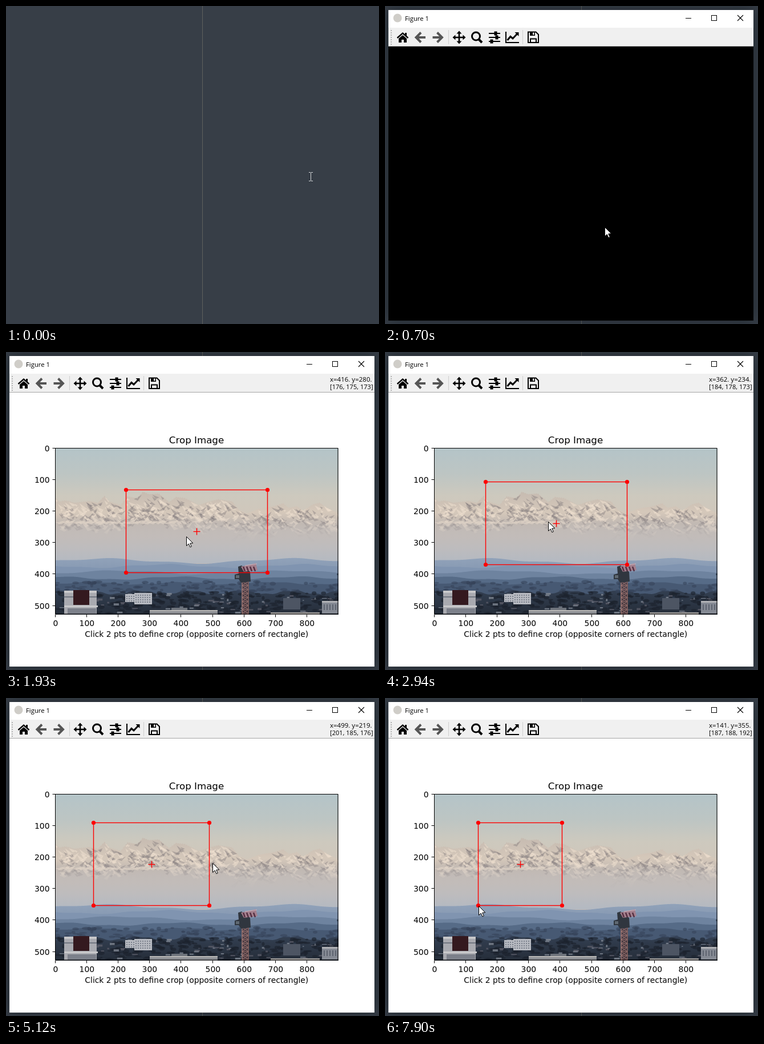
Write an HTML page with a canvas that moves like this. It is 654x557 px and loops after 8 s.

```html
<!DOCTYPE html>
<html lang="en">
<head>
<meta charset="utf-8">
<title>Crop Image</title>
<style>
html, body { margin: 0; width: 100%; height: 100%; overflow: hidden; background: #373e47; }
canvas { display: block; }
</style>
</head>
<body>
<canvas id="stage" width="654" height="557"></canvas>
<script>
const LOOP = 8000;
const SCALE = 0.5511;                       // screen pixels per image pixel
const AXES = { x: 86.5, y: 168.5, w: 496, h: 291 };
const PLOT_FONT = '"DejaVu Sans", sans-serif';
const UI_FONT = '"Open Sans", sans-serif';
const screenX = x => AXES.x + x * SCALE;
const screenY = y => AXES.y + y * SCALE;
const lerp = (a, b, p) => a + (b - a) * p;
const main = document.getElementById('stage').getContext('2d');
let ctx = main;

// ---- motion: pointer (x, y) and crop box (l, t, r, b) in image pixels ----
const START = { x: 812, y: 237, l: 225, t: 132, r: 675, b: 396 };
const MOVES = [
  [80, 240, 3, { x: 743, y: 427 }],
  [390, 560, 3, { x: 707, y: 418 }],
  [630, 700, 2, { x: 542, y: 397 }],
  [780, 780, 1, { x: 530, y: 400 }],
  [930, 1330, 6, { x: 505, y: 404 }],
  [1550, 1710, 3, { x: 385, y: 350 }],
  [1780, 1930, 3, { x: 416, y: 280 }],
  [2010, 2240, 4, { x: 424, y: 259 }],
  [2480, 3180, 10, { x: 321, y: 217, l: 121.5, t: 90, r: 571.5, b: 354 }],
  [3630, 3860, 4, { x: 600, y: 213 }],
  [4180, 4180, 1, { x: 590, y: 215 }],
  [4260, 4330, 2, { x: 581, y: 216 }],
  [4650, 5440, 11, { x: 431, y: 222, r: 422 }],
  [5510, 5670, 3, { x: 416, y: 222, r: 406.5 }],
  [5890, 6050, 3, { x: 345, y: 246 }],
  [6120, 6190, 2, { x: 164, y: 237 }],
  [6340, 6420, 2, { x: 130, y: 233 }],
  [6570, 6570, 1, { x: 123, y: 233 }],
  [6740, 6810, 2, { x: 101, y: 233 }],
  [7120, 7200, 2, { x: 112, y: 236, l: 123 }],
  [7370, 7370, 1, { x: 118, y: 240, l: 126 }],
  [7600, 7900, 5, { x: 141, y: 355, l: 140 }],
];

// Fraction completed after equally spaced jumps, the first at `from`, the last at `to`.
function stepped(t, from, to, count) {
  if (t < from) return 0;
  return Math.min(count, 1 + Math.floor((t - from + 0.5) / ((to - from) / (count - 1)) || 0)) / count;
}

function stateAt(t) {
  const s = { ...START };
  for (const [from, to, count, target] of MOVES) {
    if (t < from) break;
    const p = count === 1 ? 1 : stepped(t, from, to, count);
    for (const key in target) s[key] = lerp(s[key], target[key], p);
  }
  return s;
}

// Pixel colours reported by the status text, by image row
const SAMPLES = [[0, [181, 196, 200]], [215, [205, 187, 177]], [246, [171, 173, 170]],
  [280, [176, 175, 173]], [355, [187, 188, 192]], [410, [112, 134, 161]]];
function colourAt(y) {
  const i = Math.max(1, SAMPLES.findIndex(s => s[0] >= y));
  const [y0, a] = SAMPLES[i - 1], [y1, b] = SAMPLES[i];
  return a.map((v, n) => Math.round(lerp(v, b[n], (y - y0) / (y1 - y0))));
}

// ---- drawing helpers ----
function box(x, y, w, h, fill) { ctx.fillStyle = fill; ctx.fillRect(x, y, w, h); }
function trace(points) {
  ctx.beginPath();
  points.forEach(([x, y]) => ctx.lineTo(x, y));
}
function line(points, colour, width = 1) {
  trace(points);
  ctx.strokeStyle = colour; ctx.lineWidth = width; ctx.stroke();
}
function shape(points, fill) { trace(points); ctx.fillStyle = fill; ctx.fill(); }
function disc(x, y, r, fill) {
  ctx.beginPath(); ctx.arc(x, y, r, 0, 7); ctx.fillStyle = fill; ctx.fill();
}
function ring(x, y, r, colour, width) {
  ctx.beginPath(); ctx.arc(x, y, r, 0, 7);
  ctx.strokeStyle = colour; ctx.lineWidth = width; ctx.stroke();
}
function text(str, x, y, size, family, align = 'left') {
  ctx.font = `${size}px ${family}`; ctx.textAlign = align;
  ctx.fillStyle = '#000'; ctx.fillText(str, x, y);
}
function gradient(y0, y1, ...stops) {
  const g = ctx.createLinearGradient(0, y0, 0, y1);
  stops.forEach(([at, colour]) => g.addColorStop(at, colour));
  return g;
}

// ---- landscape picture ----
const RIDGE = [[86, 256], [94, 262], [104, 260], [120, 264], [147, 261], [161, 264], [173, 252],
  [181, 262], [201, 268], [213, 253], [230, 256], [240, 245], [251, 249], [268, 248], [286, 263],
  [298, 254], [314, 256], [338, 268], [356, 262], [372, 258], [397, 262], [408, 276], [422, 283],
  [442, 275], [470, 270], [486, 265], [496, 273], [510, 270], [521, 278], [538, 267], [550, 264],
  [563, 273], [583, 283]];
function ridgeAt(x) {
  const i = Math.max(1, RIDGE.findIndex(p => p[0] >= x));
  const [x0, y0] = RIDGE[i - 1], [x1, y1] = RIDGE[i];
  return lerp(y0, y1, (x - x0) / (x1 - x0)) + Math.sin(x * 1.7) * 0.9;
}

function drawPicture() {
  let seed = 11;
  const random = () => (seed = seed * 16807 % 2147483647) / 2147483647;
  const left = 86, right = 583, floor = 460;
  const below = yAt => {
    const pts = [];
    for (let x = left; x <= right; x += 1) pts.push([x, yAt(x)]);
    return [...pts, [right, floor], [left, floor]];
  };

  box(left, 168, 498, 292, gradient(168, 320, [0, '#b4c4c8'], [0.3, '#bdc5c3'], [0.55, '#cdc9be'], [1, '#d3c5b8']));
  shape(below(ridgeAt), gradient(245, 325, [0, '#c6bbb1'], [0.45, '#d5c8ba'], [0.7, '#c0b7b0'], [1, '#c2bbb7']));

  // Rock shadows and sunlit snow, slanting down from the crest
  ctx.save();
  trace(below(ridgeAt)); ctx.clip();
  for (let i = 0; i < 620; i++) {
    const x = left + random() * 498, depth = random();
    const y = ridgeAt(Math.min(x, 582)) + depth * 46;
    const len = 4 + random() * 12, drop = len * (0.3 + random() * 0.5), slant = random() < 0.72 ? 1 : -1;
    const colour = random() < 0.46 ? 'rgba(126,120,122,.42)' : 'rgba(239,225,208,.55)';
    shape([[x, y], [x + slant * len, y + drop], [x + slant * len * 0.5, y + drop + 2.5]], colour);
  }
  for (let x = left; x < 290; x += 9)
    shape([[x, 296 + random() * 4], [x + 18, 294 + random() * 5], [x + 10, 302]], 'rgba(232,218,202,.7)');
  ctx.restore();
  box(left, 290, 498, 80, gradient(290, 370, [0, 'rgba(194,188,185,0)'], [0.4, 'rgba(194,188,185,.92)'],
    [0.65, '#bebcbd'], [1, '#b3b9c2']));

  const hill = (base, rise, freq, phase, colour) =>
    shape(below(x => base + Math.sin(x * freq + phase) * rise + Math.sin(x * freq * 3.1) * rise * 0.3), colour);
  hill(366, 4, 0.019, 1.5, gradient(360, 400, [0, '#91a2b9'], [1, '#7f93ae']));
  hill(375, 3, 0.026, 3.8, '#8094b0');
  hill(386, 3, 0.021, 0.6, '#6e839f');
  hill(396, 2.5, 0.03, 2, '#566b87');
  hill(405, 2, 0.04, 5, '#475973');
  hill(421, 3, 0.07, 1, gradient(418, 460, [0, '#333f51'], [1, '#252d39']));

  // Woods and scattered houses
  for (let i = 0; i < 420; i++) {
    const x = left + random() * 498, y = 402 + random() * 56;
    const shade = y < 420 ? 'rgba(52,66,88,.55)' : 'rgba(27,34,44,.65)';
    ctx.beginPath();
    ctx.ellipse(x, y, 2 + random() * 6, 1 + random() * 2.5, 0, 0, 7);
    ctx.fillStyle = shade; ctx.fill();
  }
  for (let i = 0; i < 75; i++) {
    const x = left + random() * 498, y = 422 + random() * 33;
    box(x, y, 2 + random() * 8, 1 + random() * 3, random() < 0.5 ? 'rgba(142,148,160,.7)' : 'rgba(91,92,104,.8)');
  }

  // Larger buildings
  box(102, 418, 57, 41, '#a9aab0');
  box(102, 418, 57, 4, '#c7c7c9');
  box(102, 428, 57, 2, '#717681');
  box(118, 417, 28, 26, '#34191f');
  box(102, 444, 59, 3, '#c9c9cb');
  box(108, 449, 50, 10, '#7c808a');
  for (const [x, y, w, h] of [[209, 424, 17, 14], [225, 422, 31, 20]]) {
    box(x, y, w, h, '#b7bac1');
    for (let j = y + 3; j < y + h - 1; j += 4)
      for (let i = x + 2; i < x + w - 1; i += 4) box(i, j, 2, 2, '#7b818c');
  }
  box(252, 452, 119, 8, '#8e9095');
  box(252, 452, 119, 2, '#bab9b7');
  box(290, 448, 28, 4, '#6f747c');
  box(464, 456, 86, 4, '#a19f9d');
  box(486, 431, 30, 20, '#4d5563');
  box(554, 436, 29, 22, '#858a94');
  box(554, 436, 29, 3, '#b1b2b6');
  for (let x = 557; x < 582; x += 5) box(x, 442, 2, 10, '#5e6470');
  box(580, 388, 3, 3, '#4a5a70');

  // Tower crane
  box(413, 400, 13, 60, 'rgba(76,57,62,.75)');
  for (let y = 402; y < 460; y += 7) {
    line([[414, y], [425, y + 7], [414, y + 7], [425, y]], '#a07672', 1);
  }
  line([[414, 400], [414, 460]], '#a67f7a', 1.4);
  line([[425, 400], [425, 460]], '#8d6965', 1.4);
  shape([[407, 376], [413, 374], [428, 385], [429, 402], [412, 404], [408, 398], [401, 398], [401, 390], [408, 388]], '#30363f');
  shape([[412, 376], [438, 370], [441, 382], [417, 385]], '#a4808e');
  for (let x = 416; x < 439; x += 6) line([[x, 376], [x + 3, 384]], '#552f42', 2.4);
  line([[419, 374], [440, 371]], '#d0b7bf', 1);
  box(403, 391, 6, 5, '#5f6871');
}
const picture = document.createElement('canvas');
picture.width = 654; picture.height = 557;
ctx = picture.getContext('2d');
drawPicture();
ctx = main;

// ---- window ----
function drawFrame() {
  ctx.save();
  ctx.beginPath(); ctx.rect(-50, -50, 754, 657); ctx.rect(6, 7, 640, 544); ctx.clip('evenodd');
  ctx.shadowColor = 'rgba(0,10,15,.45)'; ctx.shadowBlur = 24;
  box(6, 7, 640, 544, '#000');
  ctx.restore();
  box(6, 7, 640, 544, '#fff');
  disc(22, 21, 7.5, '#cfcdc8');
  text('Figure 1', 35, 26, 11.3, UI_FONT);
  line([[527, 21.5], [537, 21.5]], '#000');
  ctx.strokeRect(572.5, 16.5, 9, 9);
  line([[618, 16], [628, 26]], '#000', 1.1);
  line([[628, 16], [618, 26]], '#000', 1.1);
}

function arrow(x, direction) {
  const d = direction;
  line([[x + 9 * d, 55], [x - 7 * d, 55]], '#555', 4);
  line([[x + d, 46.5], [x - 7.5 * d, 55], [x + d, 63.5]], '#555', 4);
}

function drawToolbar() {
  box(6, 38, 640, 32, '#f0f0f0');
  box(6, 70, 640, 1, '#a5a5a5');
  for (let y = 42; y < 68; y += 4) box(10, y, 2, 2, '#b5b5b5');
  for (const x of [111, 241]) box(x, 42, 1, 25, '#cfcfcf');

  // Home
  line([[21.5, 56], [31, 47.5], [40.5, 56]], '#000', 2.4);
  box(35, 47, 3, 6, '#000');
  shape([[24, 57], [31, 51], [38, 57], [38, 64], [33, 64], [33, 59], [29, 59], [29, 64], [24, 64]], '#000');
  arrow(62, 1);
  arrow(92.5, -1);

  // Pan
  line([[121, 55], [139, 55]], '#000', 2.6);
  line([[130, 46], [130, 64]], '#000', 2.6);
  for (let i = 0; i < 4; i++) {
    ctx.save();
    ctx.translate(130, 55); ctx.rotate(i * Math.PI / 2);
    shape([[0, -11.5], [4.5, -6.5], [-4.5, -6.5]], '#000');
    ctx.restore();
  }
  // Zoom
  ring(159.5, 53, 7, '#000', 3);
  line([[164.5, 58.5], [170, 64]], '#000', 4);
  // Sliders
  [[48, 195], [55, 187], [62, 193]].forEach(([y, x], i) => {
    line([[182, y], [202, y]], '#000', 2);
    const knob = [194, 196, 187][i];
    box(knob - 2.5, y - 3.5, 5, 7, '#000');
  });
  // Chart
  line([[212, 45], [212, 64], [235, 64]], '#000', 2);
  line([[214.5, 60], [220, 53.5], [224, 57], [232, 48.5]], '#000', 3);
  shape([[227.5, 46], [234.5, 46], [234.5, 53]], '#000');
  // Save
  line([[251, 45.5], [264.5, 45.5], [269, 50], [269, 64], [251, 64], [251, 44.6]], '#000', 2);
  line([[255, 64], [255, 57.5], [265, 57.5], [265, 64]], '#000', 2);
  box(254, 45, 9, 7, '#000');
  box(259, 46.5, 2.5, 4, '#f0f0f0');
}

function drawPlot(s, status) {
  ctx.drawImage(picture, AXES.x, AXES.y, AXES.w, AXES.h, AXES.x, AXES.y, AXES.w, AXES.h);
  ctx.strokeStyle = '#000'; ctx.lineWidth = 1;
  ctx.strokeRect(AXES.x, AXES.y, AXES.w - 0.5, AXES.h - 0.5);
  for (let v = 0; v <= 800; v += 100) {
    const x = Math.floor(screenX(v)) + 0.5, y = Math.floor(screenY(v)) + 0.5;
    line([[x, 460], [x, 464.5]], '#000');
    text(v, x + 0.3, 480, 13.89, PLOT_FONT, 'center');
    if (v > 500) continue;
    line([[81.5, y], [86, y]], '#000');
    text(v, 76.5, y + 5, 13.89, PLOT_FONT, 'right');
  }
  text('Crop Image', 334, 160, 16.67, PLOT_FONT, 'center');
  text('Click 2 pts to define crop (opposite corners of rectangle)', 334.3, 499, 13.89, PLOT_FONT, 'center');

  const [l, r] = [s.l, s.r].map(v => Math.round(screenX(v) - 0.5) + 0.5);
  const [t, b] = [s.t, s.b].map(v => Math.round(screenY(v) - 0.5) + 0.5);
  const cx = Math.round((l + r) / 2 - 0.5) + 0.5, cy = Math.round((t + b) / 2 - 0.5) + 0.5;
  ctx.strokeStyle = '#f00'; ctx.lineWidth = 1.4;
  ctx.strokeRect(l, t, r - l, b - t);
  for (const x of [l, r]) for (const y of [t, b]) disc(x, y, 3.6, '#f00');
  line([[cx - 6, cy], [cx + 6, cy]], '#f00', 1.4);
  line([[cx, cy - 6], [cx, cy + 6]], '#f00', 1.4);

  text(`x=${Math.round(status.x)}. y=${Math.round(status.y)}.`, 568, 52, 11.5, UI_FONT);
  text(`[${colourAt(Math.round(status.y)).join(', ')}]`, 568, 65, 11.1, UI_FONT);
}

function drawPointer(t, s) {
  const x = Math.round(screenX(s.x)), y = Math.round(screenY(s.y));
  if (t < 80) {
    const c = '#d5d8da';
    line([[x + 0.5, y - 7], [x + 0.5, y + 7]], c);
    for (const end of [-7.5, 7.5])
      for (const side of [-3, 1]) line([[x + side, y + end], [x + side + 3, y + end]], c);
  } else if (t < 700) {
    ring(x, y, 7.6, '#2f9af0', 4.8);
  } else {
    ctx.save();
    ctx.translate(x + 0.5, y + 0.5);
    trace([[0, 0], [0, 16], [3.7, 12.5], [6.4, 18.3], [8.8, 17.2], [6.2, 11.6], [11.3, 11.3]]);
    ctx.closePath();
    ctx.fillStyle = '#fff'; ctx.fill();
    ctx.strokeStyle = '#000'; ctx.lineWidth = 1; ctx.stroke();
    ctx.restore();
  }
}

function render(t) {
  const s = stateAt(t);
  box(0, 0, 654, 557, '#373e47');
  box(344, 0, 1, 557, '#60615e');

  const opening = stepped(t, 390, 630, 4);
  if (opening) {
    const zoom = lerp(0.952, 1, opening);
    ctx.save();
    ctx.globalAlpha = opening ** 0.88;
    ctx.translate(326, 279); ctx.scale(zoom, zoom); ctx.translate(-326, -279);
    drawFrame();
    ctx.restore();
  }
  if (t >= 700) {
    drawToolbar();
    if (t < 930) box(6, 71, 640, 480, '#000');
    // The readout rests while the pointer settles beside the left edge
    else drawPlot(s, t >= 6740 && t < 7120 ? stateAt(6739) : s);
  }
  drawPointer(t, s);
}

const begin = performance.now();
function tick() {
  render((performance.now() - begin) % LOOP);
  requestAnimationFrame(tick);
}
tick();
</script>
</body>
</html>
```
